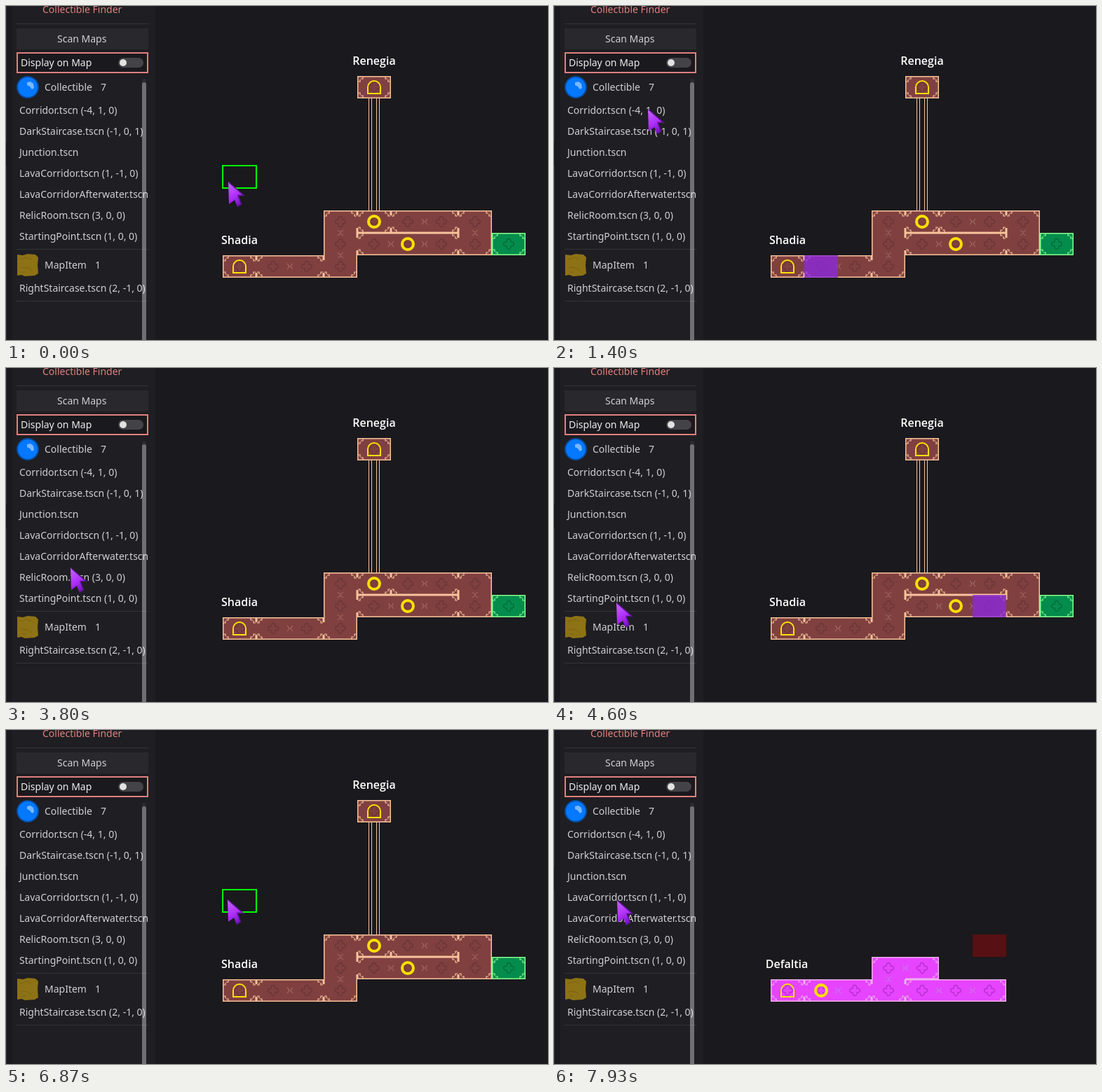
These frames come from a looping animation (773x477 px, 8 s). An HTML page:

```html
<!DOCTYPE html>
<html lang="en">
<head>
<meta charset="utf-8">
<title>Collectible Finder</title>
<style>
html, body { margin: 0; width: 100%; height: 100%; overflow: hidden; background: #1a191d; }
svg { display: block; width: 773px; height: 477px; }
text { font: 14px "Noto Sans", sans-serif; fill: #cfd0d2; white-space: pre; }
.label { font: 600 16px "Open Sans", sans-serif; fill: #fff; text-anchor: middle; }
</style>
</head>
<body>
<svg viewBox="0 0 773 477">
  <defs>
    <clipPath id="list"><path d="M0 0H203V477H0Z"/></clipPath>
    <linearGradient id="violet" x1="0" y1="0" x2="0.4" y2="1">
      <stop offset="0" stop-color="#c768f4"/>
      <stop offset="0.6" stop-color="#b030fa"/>
      <stop offset="1" stop-color="#7a14c4"/>
    </linearGradient>
  </defs>
  <path fill="#1f1e22" d="M9 0H213V477H9Z"/>
  <path fill="#303034" d="M0 0h1v195h-1zM0 228h1v249h-1z"/>
  <g id="panel" clip-path="url(#list)"></g>
  <g id="layer0"></g>
  <g id="layer1"></g>
  <rect id="mark" width="48" height="32"/>
  <rect id="frame" width="48" height="32" fill="none" stroke="#0f0" stroke-width="2"/>
  <g id="cursor">
    <path d="M0 0L23 20H14L19 32L13 36L9 26L1 32Z" fill="url(#violet)"/>
    <path d="M1 1L22 19.5H14L18.5 32L13 35" fill="none" stroke="#5a1490" stroke-width="1.5"/>
  </g>
</svg>
<script>
const $ = id => document.getElementById(id);
const W = 48, H = 32;
const cellX = c => 549 + W * c, cellY = r => 324 + H * r;

// Side panel
const text = (x, y, s, attr = '') => `<text x="${x}" y="${y}" ${attr}>${s}</text>`;
const box = (x, y, w, h, attr) => `<rect x="${x}" y="${y}" width="${w}" height="${h}" ${attr}/>`;
const line = y => box(15, y, 188, 1, 'fill="#343338"');
const header = (y, name, x, count) => text(55, y, name) + text(x, y, count);

// Each file names its map cell as (column, row, level)
const files = ['Corridor.tscn (-4, 1, 0)', 'DarkStaircase.tscn (-1, 0, 1)', 'Junction.tscn',
  'LavaCorridor.tscn (1, -1, 0)', 'LavaCorridorAfterwater.tscn', 'RelicRoom.tscn (3, 0, 0)',
  'StartingPoint.tscn (1, 0, 0)'].map((name, i) => ({ name, y: 149 + 30 * i }));
files.push({ name: 'RightStaircase.tscn (2, -1, 0)', y: 403 });
for (const f of files) f.cell = f.name.match(/-?\d+/g);

$('panel').innerHTML =
  text(52, 10, 'Collectible Finder', 'style="fill:#e0807f"') + line(25) +
  box(15, 32, 188, 30, 'fill="#29282d"') + text(73, 52, 'Scan Maps') +
  box(16, 67, 186, 28, 'fill="#1a191d" stroke="#e0807f" stroke-width="2"') +
  text(21, 86, 'Display on Map', 'style="fill:#ececed"') +
  box(160, 74, 36, 14, 'rx="7" fill="#444347"') +
  '<circle cx="167" cy="81" r="5" fill="#e2e2e2"/>' +
  '<circle cx="31" cy="116" r="15" fill="#0478ff" stroke="#074d9f" stroke-width="2"/>' +
  '<path d="M30 109l5-1 4 3 1 6-3 2-3-4-4-2z" fill="#78b8ff"/>' +
  header(121, 'Collectible', 135, 7) + line(347) +
  '<path d="M16 355l8 1 7-2 11 1 4 4-1 11 1 12-5 3-14 1-5-2-6 1v-13z" fill="#8d7216"/>' +
  '<path d="M20 362l10-3 6 3M21 373l10 1 6 4M22 380h6" fill="none" stroke="#7c640e"/>' +
  header(375, 'MapItem', 127, 1) + line(421) +
  files.map(f => text(19, f.y + 5, f.name)).join('') +
  box(194, 104, 6, 380, 'rx="3" fill="#fff" opacity=".06"') +
  box(194, 109, 6, 380, 'rx="3" fill="#fff" opacity=".32"');

// Map
const stroke = (d, color, w, x = 0, y = 0, more = '') =>
  `<path d="${d}" fill="none" stroke="${color}" stroke-width="${w}" transform="translate(${x} ${y}) ${more}"/>`;
const QUATREFOIL = 'M-3-3C-3-9 3-9 3-3C9-3 9 3 3 3C3 9-3 9-3 3C-9 3-9-3-3-3Z';
const LINK = 'M-4-4q5 4 0 8M4-4q-5 4 0 8M-2 0h4';
const SIDES = [[1, 0], [0, 1], [-1, 0], [0, -1]];

// Cells with the same letter form one room; rooms side by side share a door
function grid(col, row, rows, { fill, edge, dim, link }) {
  let floor = '', detail = '';
  const at = (c, r) => (rows[r] || '')[c] || ' ';
  rows.forEach((cells, r) => [...cells].forEach((room, c) => {
    if (room === ' ') return;
    const left = cellX(col + c), top = cellY(row + r), mx = left + W / 2, my = top + H / 2;
    const closed = (dx, dy) => at(c + dx, r + dy) !== room;
    floor += box(left, top, W, H, `fill="${fill}"`);
    detail += stroke(QUATREFOIL, dim, 1.3, mx, my);
    for (const [dx, dy] of SIDES) {
      if (!closed(dx, dy)) {
        if (dx + dy > 0) detail += stroke(LINK, link, 1.1, mx + dx * W / 2, my + dy * H / 2, `rotate(${dy * 90})`);
        continue;
      }
      const door = dx && at(c + dx, r) !== ' ';
      const d = dy ? 'M-24 0H24' : door ? 'M0-16v7M0 16v-7' : 'M0-16V16';
      detail += stroke(d, edge, 1.5, mx + dx * 23.25, my + dy * 15.25);
    }
    for (const sx of [-1, 1]) for (const sy of [-1, 1])
      if (closed(sx, 0) && closed(0, sy))
        detail += stroke('M1 8h3v-3M8 1v3h-3', edge, 1.2, mx + sx * W / 2, my + sy * H / 2, `scale(${-sx} ${-sy})`);
  }));
  return floor + detail;
}
const arch = (c, r) => stroke('M-9 9v-9a9 9 0 0 1 18 0v9z', '#ffe000', 2, cellX(c) + 24, cellY(r) + 16);
const ring = (c, r) => stroke('M-8 0a8 8 0 0 1 16 0a8 8 0 0 1-16 0z', '#ffe000', 4, cellX(c) + 24, cellY(r) + 16);
const label = (x, y, s) => text(x, y, s, 'class="label"');

const red = { fill: '#804040', edge: '#f8c39a', dim: '#6a3636', link: '#a06a62' };
const green = { fill: '#048c4c', edge: '#86ff8e', dim: '#046c3c' };
const pink = { fill: '#e644ff', edge: '#efb0ee', dim: '#b52fd0', link: '#c878e0' };

$('layer0').innerHTML =
  stroke('M517.5 132V292M521.5 132V292M528.5 132V292M532.5 132V292', red.edge, 1) +
  grid(-1, -7, ['A'], red) +
  grid(-5, -1, ['   ABCCD', '   AEEED', 'FGGA'], red) +
  grid(3, 0, ['A'], green) +
  arch(-1, -7) + arch(-5, 1) + ring(-1, -1) + ring(0, 0) +
  label(525, 84, 'Renegia') + label(333, 340, 'Shadia');
$('layer1').innerHTML =
  grid(-5, 0, ['   AA', 'BCCADDD'], pink) +
  arch(-5, 1) + ring(-4, 1) + label(332, 340, 'Defaltia');

// Pointer moves in ticks of 1/15 s: start, end, then where it comes to rest
const moves = [[12, 21, 134, 147], [21, 24, 113, 147], [29, 35, 110, 177], [39, 51, 95, 249],
  [55, 60, 90, 306], [65, 72, 89, 341], [74, 76, 89, 379], [79, 81, 95, 402], [89, 91, 98, 383],
  [96, 103, 316, 242], [104, 112, 87, 217], [112, 116, 90, 243]];

function pointer(k) {
  let x = 317, y = 251;
  for (const [from, to, tx, ty] of moves) {
    const u = Math.min(1, Math.max(0, (k - from) / (to - from)));
    const e = 1 - (1 - u) ** 2;
    x += (tx - x) * e;
    y += (ty - y) * e;
  }
  return [Math.round(x), Math.round(y)];
}
function place(el, on, c, r) {
  el.style.display = on ? '' : 'none';
  if (!on) return;
  el.setAttribute('x', cellX(c));
  el.setAttribute('y', cellY(r));
}

function draw(now) {
  const k = Math.floor((now % 8000 + 3.4) * 0.015) % 120;
  const level = k < 105 ? 0 : 1;
  const [x, y] = pointer(k);
  $('cursor').setAttribute('transform', `translate(${x} ${y})`);
  $('layer0').style.display = level ? 'none' : '';
  $('layer1').style.display = level ? '' : 'none';

  place($('frame'), x >= 213, Math.floor((x - 549) / W), Math.floor((y - 324) / H));
  const file = files.find(f => f.cell && x < 203 && Math.abs(y - f.y) < 13);
  const [c, r, z] = file ? file.cell.map(Number) : [];
  place($('mark'), file, c, r);
  $('mark').setAttribute('fill', z === level ? 'rgba(140,40,225,.77)' : 'rgba(200,0,0,.35)');
}

const start = performance.now();
function loop() {
  draw(performance.now() - start);
  requestAnimationFrame(loop);
}
loop();
</script>
</body>
</html>
```
